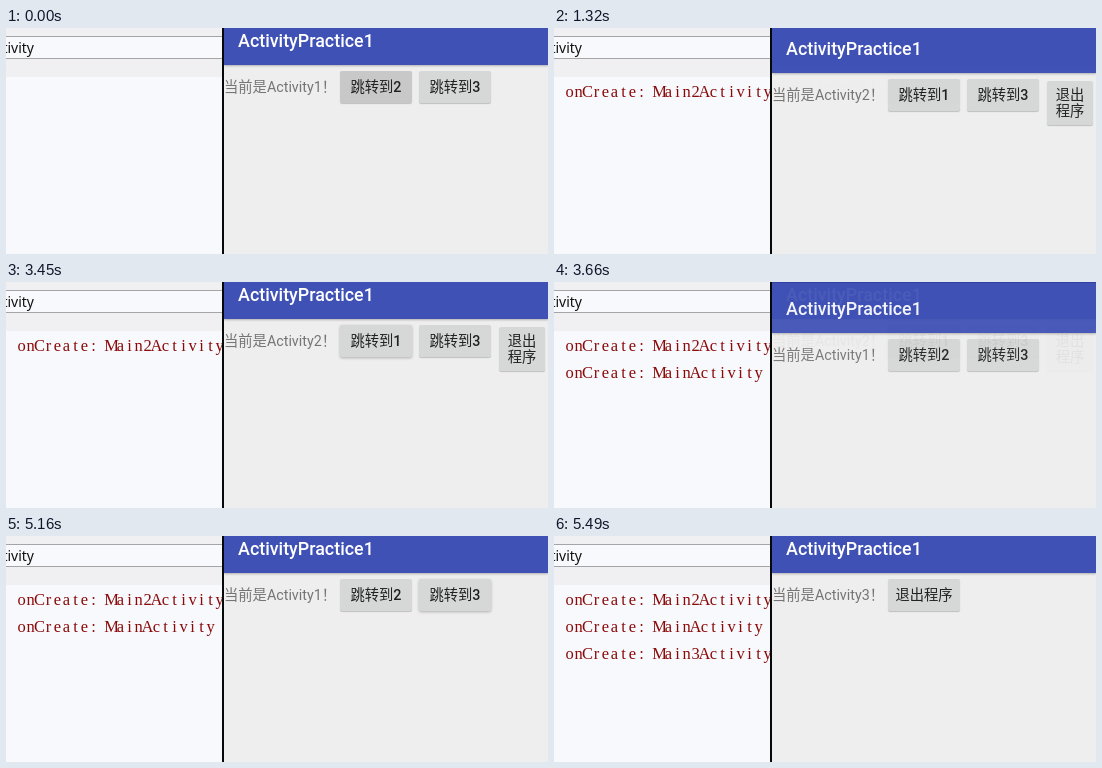
Animation of 542 by 226 pixels, one loop 6.75 s. Source, as an HTML page:

```html
<!DOCTYPE html>
<html lang="zh-CN">
<head>
<meta charset="utf-8">
<style>
  html, body { margin: 0; width: 100%; height: 100%; overflow: hidden; background: #f8f9fc; }
  div { position: absolute; box-sizing: border-box; white-space: pre; }
  #tools { left: 0; top: 0; width: 216px; height: 49px; background: #f0f0f2; }
  #field { left: 0; top: 8px; width: 216px; height: 23px; overflow: hidden; background: #f8f9fc;
    border: solid #a5a5a7; border-width: 1px 0; }
  #field div { right: 188px; top: 0; font: 14px/21px "Noto Sans", sans-serif; color: #111; }
  #log { left: 11px; top: 50px; width: 205px; height: 176px; overflow: hidden; color: #8a0a0a;
    font: 16.5px/27px "Liberation Serif", serif; }
  #log span { display: inline-flex; width: 9px; justify-content: center; }
  #phone { left: 216px; top: 0; width: 326px; height: 226px; overflow: hidden;
    border-left: 2px solid #050909; background: #eee; }
  .screen { left: 0; top: 0; width: 324px; height: 226px; background: #eee;
    font: 14.3px/16px Roboto, "Noto Sans CJK SC", "Noto Sans CJK", sans-serif; }
  .bar { left: 0; top: -60px; width: 100%; height: 97px;
    background: linear-gradient(#303f9f 47px, #3f51b5 47px); box-shadow: 0 1px 2px #0004; }
  .title { left: 14px; top: 62px; font-size: 17.85px; line-height: 22px; font-weight: 500; color: #fff; }
  .label { left: 0; top: 51px; color: #757575; font-family: Roboto, "Noto Sans CJK TC", "Noto Sans CJK", sans-serif; }
  .button { display: flex; align-items: center; justify-content: center; overflow: hidden;
    border-radius: 2px; background-color: #d6d7d7; color: #212121; font-weight: 500;
    box-shadow: 0 1px 1px #0003; }
</style>
</head>
<body>
<div id="tools"><div id="field"><div>Activity</div></div></div>
<div id="log"></div>
<div id="phone"></div>
<script>
const LOOP = 6750, STEP = 30;
const phone = document.getElementById('phone');
const log = document.getElementById('log');
const clamp = v => Math.max(0, Math.min(1, v));

function add(parent, name, text = '') {
  const el = document.createElement('div');
  el.className = name;
  el.textContent = text;
  parent.append(el);
  return el;
}

// Buttons are [text, x, y, width, height].
function makeScreen(number, buttons) {
  const el = add(phone, 'screen');
  add(add(el, 'bar'), 'title', 'ActivityPractice1');
  add(el, 'label', `当前是Activity${number}！`);
  const keys = buttons.map(([text, x, y, w, h]) => {
    const key = add(el, 'button', text);
    key.style.cssText = `left:${x}px;top:${y}px;width:${w}px;height:${h}px`;
    return key;
  });
  return { el, keys };
}

// One fixed-width cell per character.
function makeLine(text, row) {
  const line = add(log, 'line');
  line.style.top = row * 27 + 'px';
  for (const ch of text) {
    const cell = document.createElement('span');
    cell.textContent = ch === ' ' ? '\u00a0' : ch;
    line.append(cell);
  }
  return line;
}

const first = text => [text, 116, 43, 72, 32];
const second = ['跳转到3', 195, 43, 72, 32];
const home = () => makeScreen(1, [first('跳转到2'), second]);
const screens = [
  home(),
  makeScreen(2, [first('跳转到1'), second, ['退出\n程序', 275, 45, 46, 44]]),
  home(),
  makeScreen(3, [first('退出程序')])
];

// Each move presses a key on one screen, then slides the next screen in.
const moves = [
  { key: 0, raise: 990, ripple: -120, log: 1140, go: 1200, show: 1200, name: 'Main2Activity' },
  { key: 0, raise: 3450, ripple: 3450, log: 3540, go: 3570, show: 3570, name: 'MainActivity' },
  { key: 1, raise: 5160, ripple: 5250, log: 5310, go: 5250, show: 5370, name: 'Main3Activity' }
];
const lines = moves.map((move, i) => makeLine('onCreate: ' + move.name, i));

const show = (el, on) => el.style.visibility = on ? 'visible' : 'hidden';

function pressKey(key, t, move) {
  const r = clamp((t - move.ripple) / 120) * 75;
  key.style.backgroundImage =
    `radial-gradient(circle at 50% 60%, #c8c8c8 ${r}px, transparent ${r}px)`;
  key.style.boxShadow = t >= move.raise ? '0 1px 3px #0004' : '';
}

function slideIn(el, t, move) {
  const age = t - move.go;
  show(el, t >= move.show);
  el.style.opacity = 1 - (1 - clamp(age / 150)) ** 3;
  el.style.transform = `translateY(${Math.round(45 * (1 - clamp(age / 240)) ** 2.5)}px)`;
}

function draw(now) {
  const t = Math.floor(now % LOOP / STEP) * STEP;
  moves.forEach((move, i) => {
    pressKey(screens[i].keys[move.key], t, move);
    slideIn(screens[i + 1].el, t, move);
    show(lines[i], t >= move.log);
  });
}

let start;
function tick(now) {
  start ??= now;
  draw(now - start);
  requestAnimationFrame(tick);
}
draw(0);
requestAnimationFrame(tick);
</script>
</body>
</html>
```
